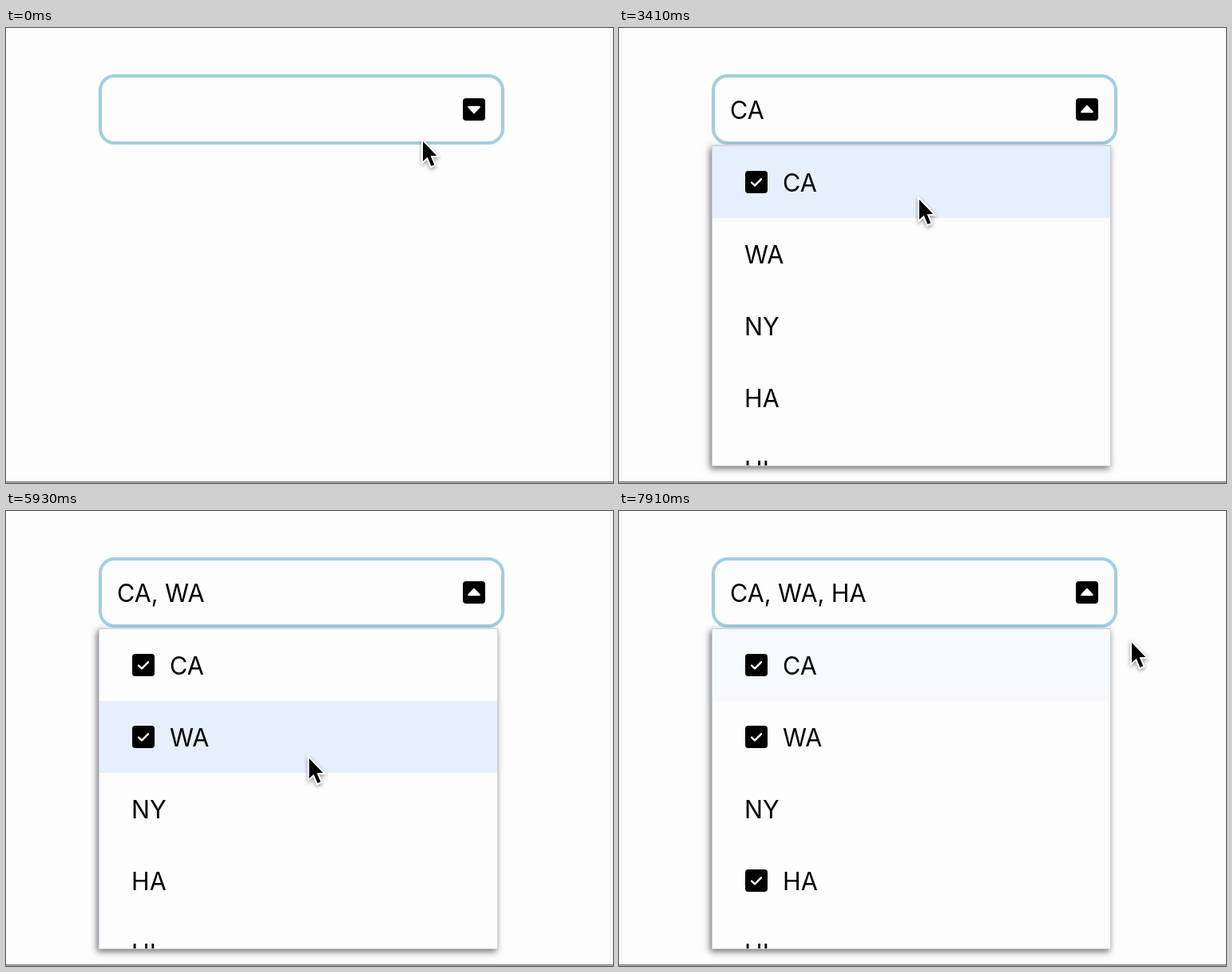
Write an HTML page with a canvas that moves like this. It is 760 by 570 pixels and loops after 8000 ms.

```html
<!DOCTYPE html>
<html lang="en">
<head>
<meta charset="utf-8">
<title>Multi-select dropdown</title>
<style>
html, body { margin: 0; width: 100%; height: 100%; overflow: hidden; background: #fdfdfd; }
canvas { display: block; width: 760px; height: 570px; }
</style>
</head>
<body>
<canvas id="stage" width="760" height="570"></canvas>
<script>
const ctx = document.getElementById('stage').getContext('2d');
const LOOP = 8000;
const PAPER = '#fdfdfd';
const INK = '#000';
const ROW_HEIGHT = 90;
const PANEL = { x: 117, y: 148, w: 498, h: 400 };
const FADE_IN = 400;
const FADE_OUT = 150;
const OPEN_AT = 1450;

// checkedAt: time of selection; hovers: [enter, leave] pairs
const rows = [
  { label: 'CA', checkedAt: 2850, hovers: [[2425, 3960], [7755, 7900]] },
  { label: 'WA', checkedAt: 5110, hovers: [[4000, 5970], [7700, 7755]] },
  { label: 'NY', checkedAt: Infinity, hovers: [[5950, 6400], [7645, 7700]] },
  { label: 'HA', checkedAt: 6950, hovers: [[6400, 7645]] },
  { label: 'HI', checkedAt: Infinity, hovers: [] }
];

// Pointer moves: start time, end time, x, y
const pointerStart = [522, 142];
const pointerMoves = [
  [20, 590, 428, 128],
  [2230, 2550, 375, 231],
  [2570, 2740, 376, 215],
  [3420, 4775, 378, 284],
  [5690, 6740, 390, 480],
  [7490, 7910, 642, 165]
];

const clamp = v => Math.max(0, Math.min(1, v));
const smooth = p => p * p * (3 - 2 * p);

function pointerAt(t) {
  let [x, y] = pointerStart;
  for (const [from, to, nx, ny] of pointerMoves) {
    if (t < from) break;
    const p = smooth(clamp((t - from) / (to - from)));
    x += (nx - x) * p;
    y += (ny - y) * p;
  }
  return [x, y];
}

function hoverLevel(row, t) {
  return Math.max(0, ...row.hovers.map(([enter, leave]) => {
    if (t < enter) return 0;
    const reached = clamp((Math.min(t, leave) - enter) / FADE_IN);
    return reached - Math.max(0, t - leave) / FADE_OUT;
  }));
}

function roundBox(x, y, w, h, r) {
  ctx.beginPath();
  ctx.roundRect(x, y, w, h, r);
}

function polyline(points) {
  ctx.beginPath();
  points.forEach(([x, y]) => ctx.lineTo(x, y));
}

function text(label, x, y) {
  ctx.fillStyle = INK;
  ctx.fillText(label, x, y);
}

function iconSquare(x, y) {
  ctx.fillStyle = INK;
  roundBox(x, y, 28, 28, 4);
  ctx.fill();
  ctx.strokeStyle = ctx.fillStyle = '#fff';
  ctx.lineJoin = ctx.lineCap = 'round';
}

function drawCaret(open) {
  iconSquare(572, 88);
  const base = open ? 105 : 99;
  const tip = open ? 98 : 106;
  polyline([[579.5, base], [592.5, base], [586, tip]]);
  ctx.closePath();
  ctx.lineWidth = 2.5;
  ctx.fill();
  ctx.stroke();
}

function drawCheck(x, y) {
  iconSquare(x, y);
  polyline([[x + 8, y + 14.5], [x + 12, y + 18.3], [x + 20, y + 10.3]]);
  ctx.lineWidth = 2.4;
  ctx.stroke();
}

function drawField(t) {
  ctx.strokeStyle = '#a0cfe1';
  ctx.lineWidth = 4;
  roundBox(118, 60, 504, 84, 18);
  ctx.stroke();
  drawCaret(t >= OPEN_AT);
  const chosen = rows.filter(row => t >= row.checkedAt).map(row => row.label);
  text(chosen.join(', '), 139, 114);
}

function drawRow(row, index, t) {
  const y = PANEL.y + index * ROW_HEIGHT;
  const checked = t >= row.checkedAt;
  ctx.fillStyle = `rgba(229, 240, 252, ${hoverLevel(row, t)})`;
  ctx.fillRect(PANEL.x, y, PANEL.w, ROW_HEIGHT);
  if (checked) drawCheck(158, y + 31);
  text(row.label, checked ? 205 : 157, y + 57);
}

function drawPanel(t) {
  const shown = smooth(clamp((t - OPEN_AT - 20) / 300));
  if (!shown) return;
  const { x, y, w, h } = PANEL;
  ctx.save();
  ctx.globalAlpha = shown;
  ctx.translate(0, y);
  ctx.scale(1, 0.8 + 0.2 * shown);
  ctx.translate(0, -y);

  ctx.save();
  ctx.shadowColor = 'rgba(35, 35, 50, 0.65)';
  ctx.shadowBlur = 8;
  ctx.shadowOffsetX = -2;
  ctx.shadowOffsetY = 3;
  ctx.fillStyle = '#d0d0d6';
  ctx.fillRect(x - 1, y - 1, w + 2, h + 2);
  ctx.restore();

  ctx.beginPath();
  ctx.rect(x, y, w, h);
  ctx.clip();
  ctx.fillStyle = PAPER;
  ctx.fill();
  rows.forEach((row, i) => drawRow(row, i, t));
  ctx.restore();
}

function drawPointer(t) {
  ctx.save();
  ctx.translate(...pointerAt(t));
  polyline([[0, 0], [0, 25], [5.7, 19.8], [10.5, 31], [14.3, 29.3], [9.6, 18.3], [17.3, 18]]);
  ctx.closePath();
  ctx.lineJoin = 'miter';
  ctx.lineWidth = 4;
  ctx.strokeStyle = '#fff';
  ctx.shadowColor = 'rgba(0, 0, 0, 0.4)';
  ctx.shadowBlur = 5;
  ctx.shadowOffsetY = 2;
  ctx.stroke();
  ctx.shadowColor = 'transparent';
  ctx.fillStyle = INK;
  ctx.fill();
  ctx.restore();
}

function draw(t) {
  ctx.fillStyle = PAPER;
  ctx.fillRect(0, 0, 760, 570);
  ctx.fillStyle = '#757575';
  ctx.fillRect(0, 568, 760, 1.5);
  ctx.font = '30.5px Inter, sans-serif';
  drawField(t);
  drawPanel(t);
  drawPointer(t);
}

let start;
function frame(now) {
  start ??= now;
  draw((now - start) % LOOP);
  requestAnimationFrame(frame);
}
requestAnimationFrame(frame);
</script>
</body>
</html>
```
